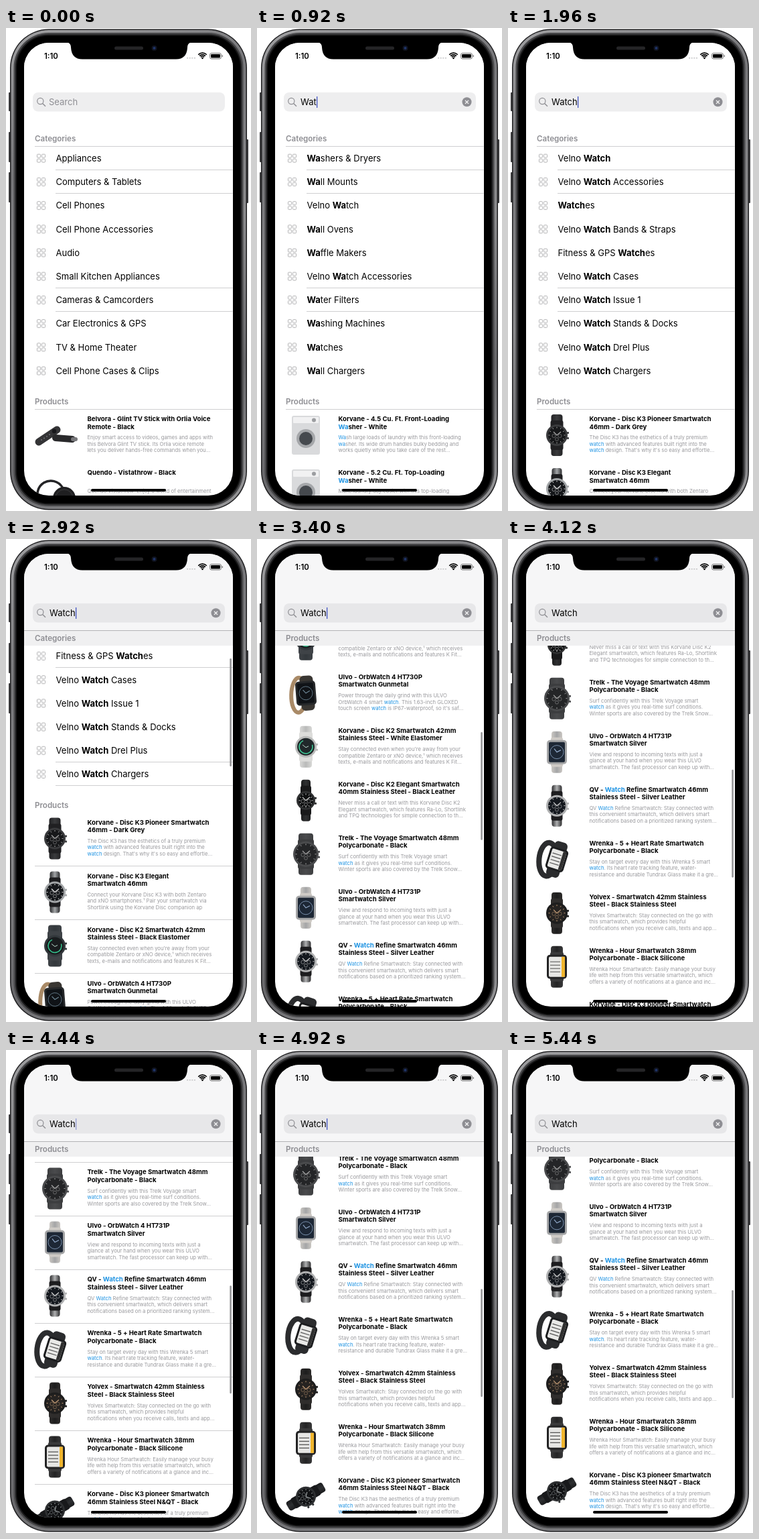
Recreate the animation shown at these times as an HTML page with a canvas. Size 366 by 720 pixels, loop 5.48 s.

```html
<!DOCTYPE html>
<html lang="en">
<head>
<meta charset="utf-8">
<title>Search as you type</title>
<style>
html, body { margin: 0; width: 100%; height: 100%; overflow: hidden; background: #fff; }
canvas { display: block; width: 366px; height: 720px; }
</style>
</head>
<body>
<canvas></canvas>
<script>
const W = 366, H = 720, LOOP = 5480, STEP = 40;
const canvas = document.querySelector('canvas'), c = canvas.getContext('2d');
const dpr = window.devicePixelRatio || 1;
canvas.width = W * dpr;
canvas.height = H * dpr;

const WORD = 'Watch', TYPED = [40, 440, 880, 1480, 1800], DELAY = 80;
const BLUE = '#1c92e2', GREY = '#8e8e93';
const clamp = v => Math.max(0, Math.min(1, v));
const font = (size, weight = 400) => `${weight} ${size}px Inter, Roboto, sans-serif`;

// ---- content ----
const split = s => s.split('|');
const finalCats = split('Velno Watch|Velno Watch Accessories|Watches|Velno Watch Bands & Straps|Fitness & GPS Watches|Velno Watch Cases|Velno Watch Issue 1|Velno Watch Stands & Docks|Velno Watch Drel Plus|Velno Watch Chargers');
const categories = [
  split('Appliances|Computers & Tablets|Cell Phones|Cell Phone Accessories|Audio|Small Kitchen Appliances|Cameras & Camcorders|Car Electronics & GPS|TV & Home Theater|Cell Phone Cases & Clips'),
  split('Washers & Dryers|Wireless Headphones|Wall Mounts|Wearable Technology|Wireless Speakers|Wall Ovens|Webcams|Window Air Conditioners|Waffle Makers|Wine Coolers'),
  split('Washers & Dryers|Wall Mounts|Velno Watch|Wall Ovens|Waffle Makers|Velno Watch Accessories|Water Filters|Washing Machines|Watches|Wall Chargers'),
  split('Velno Watch|Velno Watch Accessories|Watches|Water Filters|Velno Watch Bands & Straps|Fitness & GPS Watches|Water Coolers|Velno Watch Cases|Water Dispensers|Velno Watch Chargers'),
  finalCats, finalCats
];

const homeItems = [
  'Belvora - Glint TV Stick with Orlia Voice|Remote - Black|Enjoy smart access to videos, games and apps with|this Belvora Glint TV stick. Its Orlia voice remote|lets you deliver hands-free commands when you...',
  'Quendo - Vistathrow - Black||Quendo Vistathrow: Enjoy a world of entertainment|with a small player that can connect to your|HDTV and stream from your phone or tablet...'
];
const washItems = [
  'Korvane - 4.5 Cu. Ft. Front-Loading|Washer - White|Wash large loads of laundry with this front-loading|washer. Its wide drum handles bulky bedding and|works quietly while you take care of the rest...',
  'Korvane - 5.2 Cu. Ft. Top-Loading|Washer - White|Make laundry day easier with this top-loading|washer. Its water sensor adapts to every load|without wasting time, energy or detergent...'
];
const watchItems = [
  'Korvane - Disc K3 Pioneer Smartwatch|46mm - Dark Grey|The Disc K3 has the esthetics of a truly premium|watch with advanced features built right into the|watch design. That\'s why it\'s so easy and effortle...',
  'Korvane - Disc K3 Elegant|Smartwatch 46mm|Connect your Korvane Disc K3 with both Zentaro|and xNO smartphones.¹ Pair your smartwatch via|Shortlink using the Korvane Disc companion ap',
  'Korvane - Disc K2 Smartwatch 42mm|Stainless Steel - Black Elastomer|Stay connected even when you\'re away from your|compatible Zentaro or xNO device,¹ which receives|texts, e-mails and notifications and features K Fit...',
  'Ulvo - OrbWatch 4 HT730P|Smartwatch Gunmetal|Power through the daily grind with this ULVO|OrbWatch 4 smart watch. This 1.63-inch GLOXED|touch screen watch is IP67-waterproof, so it\'s saf...',
  'Korvane - Disc K2 Smartwatch 42mm|Stainless Steel - White Elastomer|Stay connected even when you\'re away from your|compatible Zentaro or xNO device,¹ which receives|texts, e-mails and notifications and features K Fit...',
  'Korvane - Disc K2 Elegant Smartwatch|40mm Stainless Steel - Black Leather|Never miss a call or text with this Korvane Disc K2|Elegant smartwatch, which features Ra-Lo, Shortlink|and TPQ technologies for simple connection to th...',
  'Trelk - The Voyage Smartwatch 48mm|Polycarbonate - Black|Surf confidently with this Trelk Voyage smart|watch as it gives you real-time surf conditions.|Winter sports are also covered by the Trelk Snow...',
  'Ulvo - OrbWatch 4 HT731P|Smartwatch Silver|View and respond to incoming texts with just a|glance at your hand when you wear this ULVO|smartwatch. The fast processor can keep up with...',
  'QV - Watch Refine Smartwatch 46mm|Stainless Steel - Silver Leather|QV Watch Refine Smartwatch: Stay connected with|this convenient smartwatch, which delivers smart|notifications based on a prioritized ranking system...',
  'Wrenka - 5 + Heart Rate Smartwatch|Polycarbonate - Black|Stay on target every day with this Wrenka 5 smart|watch. Its heart rate tracking feature, water-|resistance and durable Tundrax Glass make it a gre...',
  'Yolvex - Smartwatch 42mm Stainless|Steel - Black Stainless Steel|Yolvex Smartwatch: Stay connected on the go with|this smartwatch, which provides helpful|notifications when you receive calls, texts and app...',
  'Wrenka - Hour Smartwatch 38mm|Polycarbonate - Black Silicone|Wrenka Hour Smartwatch: Easily manage your busy|life with help from this versatile smartwatch, which|offers a variety of notifications at a glance and inc...',
  'Korvane - Disc K3 pioneer Smartwatch|46mm Stainless Steel N&QT - Black|The Disc K3 has the aesthetics of a truly premium|watch with advanced features built right into the|watch design. That\'s why it\'s so easy and effortle...'
];
// shape, radius, strap width, strap, rim, face, accent, angle
const looks = [
  ['round', 16, 19, '#202022', '#3a3b3d', '#17181a', '#a9a9a9', 0],
  ['round', 16, 17, '#1d1d1f', '#a3a6a8', '#15171a', '#e8e8e8', 0],
  ['ring', 16, 22, '#3f4347', '#33383c', '#191c1e', '#35c48f', 0],
  ['square', 15, 19, '#a98a67', '#26282a', '#101317', '#6d8796', -.08],
  ['ring', 16, 20, '#dcdcda', '#b9bab9', '#20282a', '#3fd09b', 0],
  ['round', 14, 16, '#19191a', '#2f3031', '#0e0f10', '#d5d5d5', 0],
  ['round', 19, 24, '#3c3d3f', '#4a4b4d', '#242527', '#aaaaaa', 0],
  ['square', 15, 18, '#cfcbc6', '#a4a5a6', '#1d2735', '#8fa7c7', 0],
  ['round', 16, 17, '#1c1c1e', '#b0b1b2', '#14181e', '#d9d9d9', 0],
  ['paper', 14, 20, '#2b2c2e', '#1c1d1f', '#e9e9e7', '#303030', .3],
  ['round', 16, 18, '#2f2d2c', '#1d1d1d', '#262321', '#c19a75', 0],
  ['paper', 15, 20, '#3a3a3b', '#232324', '#e6e6e4', '#f0b52d', 0],
  ['round', 15, 17, '#18191b', '#2d2f31', '#111214', '#9ba0a2', 1.05]
];

// ---- drawing helpers ----
function box(x, y, w, h, r, fill) {
  c.beginPath();
  c.roundRect(x, y, w, h, r);
  c.fillStyle = fill;
  c.fill();
}
function disc(x, y, r, fill) {
  c.beginPath();
  c.arc(x, y, r, 0, 7);
  c.fillStyle = fill;
  c.fill();
}
function path(points, color, width = 1) {
  c.beginPath();
  points.forEach(([x, y]) => c.lineTo(x, y));
  c.strokeStyle = color;
  c.lineWidth = width;
  c.stroke();
}
function arc(x, y, r, from, to, color, width) {
  c.beginPath();
  c.arc(x, y, r, from, to);
  c.strokeStyle = color;
  c.lineWidth = width;
  c.stroke();
}
function text(s, x, y, f, color) {
  c.font = f;
  c.fillStyle = color;
  c.fillText(s, x, y);
  return x + c.measureText(s).width;
}
// Words that begin with the query get the second font and colour.
function marked(s, x, y, query, plain, hit) {
  const parts = query ? s.split(new RegExp(`(\\b${query})`, 'i')) : [s];
  if (query && parts.length > 1) parts.push(...s.slice(parts.join('').length));
  parts.forEach((p, i) => { x = text(p, x, y, ...(i % 2 ? hit : plain)); });
}
// Hairlines survive downsampling only at some subpixel offsets.
function hairline(x, y) {
  const f = y - Math.floor(y);
  if (f > .15 && f < .55) box(x, Math.floor(y), 338.5 - x, 1, 0, '#cfcfd1');
}

// ---- product pictures ----
function watch([shape, r, sw, strap, rim, face, accent, angle]) {
  c.rotate(angle);
  const flat = shape === 'square' || shape === 'paper';
  if (strap === '#a98a67') {
    c.beginPath();
    c.ellipse(-11, 2, 11, 26, .1, 0, 7);
    c.strokeStyle = strap;
    c.lineWidth = 6;
    c.stroke();
    box(-8, -26, 20, 52, 6, '#393632');
  } else if (shape === 'paper' && angle) {
    c.beginPath();
    c.ellipse(-13, 4, 13, 25, -.2, 0, 7);
    c.strokeStyle = strap;
    c.lineWidth = 8;
    c.stroke();
    box(-10, -27, 20, 54, 6, strap);
  } else {
    const g = c.createLinearGradient(-sw / 2, 0, sw / 2, 0);
    g.addColorStop(0, strap);
    g.addColorStop(.5, rim);
    g.addColorStop(1, strap);
    box(-sw / 2 + 1, -31, sw - 2, 62, 4, g);
    box(-sw / 2, -22, sw, 44, 3, strap);
  }
  if (flat) {
    box(-r, -r - 3, 2 * r, 2 * r + 6, 5, rim);
    box(-r + 3, -r, 2 * r - 6, 2 * r, 2, face);
    if (shape === 'paper') {
      box(r - 8, -r, 5, 2 * r, 0, accent);
      for (let y = -8; y < 10; y += 5) box(-r + 5, y, r, 1.2, 0, '#555');
    } else {
      arc(0, 0, r - 5, 0, 7, accent, .8);
      path([[-4, -5], [0, 0], [6, -3]], accent, 1.2);
    }
    return;
  }
  box(r - 1, -5, 3, 3, 1, rim);
  box(r - 1, 3, 3, 3, 1, rim);
  disc(0, 0, r, rim);
  disc(0, 0, r - 3, face);
  if (shape === 'ring') {
    arc(0, 0, r - 6, -.3, 4.3, accent, 1.5);
    path([[-5, -3], [0, 1], [4, -1]], '#b9d8cc');
    return;
  }
  for (let i = 0; i < 12; i++) {
    const a = i * Math.PI / 6, x = Math.cos(a), y = Math.sin(a);
    path([[x * (r - 5.5), y * (r - 5.5)], [x * (r - 3.6), y * (r - 3.6)]], accent);
  }
  arc(-4.5, 1, 2.6, 0, 7, accent, .5);
  arc(4.5, 1, 2.6, 0, 7, accent, .5);
  arc(0, 6, 2.4, 0, 7, accent, .5);
  path([[-5, -5], [0, 0], [6, -5]], accent, 1.2);
}
function tvStick() {
  c.lineCap = 'round';
  path([[-24, 10], [3, -8]], '#343436', 11);
  path([[1, 4], [26, 6]], '#29292b', 10);
  path([[27, 6], [31, 6]], '#77777a', 6);
  disc(-1, -6, 3.2, '#17171a');
  for (let i = 0; i < 4; i++) disc(-8 - i * 4, -1 + i * 2.7, 1, '#707074');
  c.lineCap = 'butt';
}
function streamer() {
  arc(-6, 8, 20, 2.6, 5.9, '#242426', 3.5);
  disc(14, 14, 17, '#1f1f21');
  arc(14, 14, 13, 0, 7, '#39393b', 1);
  box(-29, 16, 11, 17, 2, '#2f2f31');
}
function washer() {
  box(-21, -29, 42, 58, 3, '#d9dadc');
  box(-19, -27, 38, 9, 1, '#f1f1f2');
  disc(12, -22.5, 3, '#9b9da0');
  disc(0, 5, 14, '#a5a7aa');
  disc(0, 5, 10, '#45494e');
}

const products = [
  { items: homeItems, art: i => i ? streamer() : tvStick() },
  { items: washItems, art: washer },
  { items: washItems, art: washer },
  ...Array(3).fill({ items: watchItems, art: i => watch(looks[i]) })
];

// ---- motion ----
function hermite(t, [t0, s0, v0], [t1, s1, v1]) {
  const d = t1 - t0, u = (t - t0) / d, w = 1 - u;
  return s0 * (1 + 2 * u) * w * w + v0 * d * u * w * w
       + s1 * u * u * (3 - 2 * u) - v1 * d * u * u * w;
}
const drags = [[2400, 0, 0], [2920, 160.5, 1.1], [3400, 617.2, .35], [3400, 617.2, 0], [3520, 617.2, 0], [3800, 788.6, .26]];
function scrollAt(t) {
  if (t <= drags[0][0]) return 0;
  if (t >= 3800) return 913.2 - 124.6 * Math.exp((3800 - t) / 478.4);
  const i = drags.findIndex(k => t < k[0]);
  return hermite(t, drags[i - 1], drags[i]);
}
const blink = [[3400, 1], [3800, .5], [3960, 0], [4280, 0], [4440, .5], [4600, 1], [5200, 1], [5400, 0]];
function caretAt(t) {
  const i = blink.findIndex(k => t < k[0]);
  if (i < 1) return i ? 0 : 1;
  const [t0, a] = blink[i - 1], [t1, b] = blink[i];
  return a + (b - a) * (t - t0) / (t1 - t0);
}

// ---- scene ----
function phone() {
  [[96, 28], [155, 45], [215, 45]].forEach(([y, h]) => box(4, y, 4, h, 1, '#3c3c3e'));
  box(358, 166, 4, 95, 1, '#3c3c3e');
  box(6, 1.5, 354, 717, 58, '#202022');
  const steel = c.createLinearGradient(0, 0, W, H);
  ['#a2a2a4', '#77777a', '#8c8c8e', '#68686b', '#9a9a9c'].forEach((k, i) => steel.addColorStop(i / 4, k));
  box(7.5, 3, 351, 714, 56.5, steel);
  box(11.5, 7, 343, 706, 52, '#48484a');
  box(14, 9.5, 338, 701, 49.5, '#1a1a1b');
  box(16, 11.5, 334, 697, 47.5, '#000');
}
function notch() {
  c.beginPath();
  c.moveTo(90, 21);
  c.quadraticCurveTo(97, 22, 97, 29);
  c.quadraticCurveTo(98, 46.5, 114, 46.5);
  c.lineTo(254, 46.5);
  c.quadraticCurveTo(270, 46.5, 271, 29);
  c.quadraticCurveTo(271, 22, 278, 21);
  c.fillStyle = '#000';
  c.fill();
  box(162, 27.5, 43, 5, 2.5, '#252527');
  disc(221.5, 30, 4, '#10131f');
  disc(221.5, 30, 2, '#1f3468');
}
function statusBar() {
  text('1:10', 57, 46, font(11.4, 600), '#000');
  for (let i = 0; i < 4; i++) box(270 + i * 3.6, 44, 2.2, 1.6, .5, '#c4c4c6');
  for (const r of [3.6, 6.2, 8.8]) arc(293.5, 46, r, -2.36, -.78, '#000', 1.7);
  disc(293.5, 45, 1.3, '#000');
  c.beginPath();
  c.roundRect(304.5, 37.5, 17, 8.5, 2.5);
  c.strokeStyle = '#777';
  c.lineWidth = 1;
  c.stroke();
  box(306, 39, 14, 5.5, 1.3, '#000');
  box(322.7, 40.2, 1.3, 3, .6, '#777');
}
function searchField(typed, t, shade) {
  box(40, 96, 287, 28.5, 8, shade ? '#e7e7e9' : '#eeeeef');
  arc(51.3, 109, 4.6, 0, 7, GREY, 1.2);
  path([[54.6, 112.4], [59, 116.8]], GREY, 1.4);
  if (!typed) {
    text('Search', 64, 115, font(13), GREY);
    return;
  }
  const end = text(typed, 65, 115, font(13), '#000');
  c.globalAlpha = caretAt(t);
  box(end + .3, 102, 1.3, 17, .5, '#4254c2');
  c.globalAlpha = 1;
  disc(313.5, 110.3, 7, GREY);
  path([[311, 107.8], [316, 112.8]], '#fff', 1.2);
  path([[316, 107.8], [311, 112.8]], '#fff', 1.2);
}
function categoryRow(name, y, query) {
  c.strokeStyle = '#b4b4b6';
  c.lineWidth = 1;
  for (const dx of [0, 7]) for (const dy of [0, 7]) {
    c.beginPath();
    c.roundRect(46.5 + dx, y - 6 + dy, 5, 5, 1);
    c.stroke();
  }
  marked(name, 74.5, y + 4.8, query, [font(13), '#000'], [font(13, 700), '#000']);
}
function productRow({ items, art }, i, top, query, fade) {
  c.save();
  c.globalAlpha = fade;
  c.translate(73, top + 39);
  art(i);
  c.restore();
  items[i].split('|').forEach((s, n) => {
    const f = n < 2 ? font(9.6, 700) : font(7.7);
    const y = top + (n < 2 ? 18 + n * 11.5 : 45.2 + (n - 2) * 9.6);
    marked(s, 121.5, y, query, [f, n < 2 ? '#000' : '#98989c'], [f, BLUE]);
  });
}
function sectionHeader(name, y, stuck) {
  if (stuck) box(27, 137, 312, 22, 0, '#f0f0f1');
  text(name, 43, y + 4.3, font(11.6, 600), GREY);
}

function draw(t) {
  const count = delay => TYPED.filter(k => t >= k + delay).length;
  const stage = count(DELAY), query = WORD.slice(0, stage);
  const s = scrollAt(t), shade = clamp(s / 18);
  const swapped = stage === 1 || stage === 3;
  const fade = swapped ? clamp((t - TYPED[stage - 1] - DELAY + STEP) / 120) : 1;

  c.setTransform(dpr, 0, 0, dpr, 0, 0);
  c.fillStyle = '#fff';
  c.fillRect(0, 0, W, H);
  phone();
  c.save();
  c.beginPath();
  c.roundRect(27, 22, 312, 675, 37);
  c.clip();
  c.fillStyle = '#fff';
  c.fillRect(27, 22, 312, 675);

  categories[stage].forEach((name, i) => {
    const y = 194.2 + 35.2 * i - s;
    if (y > 110) categoryRow(name, y, query);
    hairline(74, 176 + 35.2 * (i + 1) - s);
  });
  hairline(43, 176.3 - s);
  hairline(43, 568.3 - s);
  const list = products[stage];
  list.items.forEach((_, i) => {
    const top = 568 + 80 * i - s;
    if (top < 50 || top > 700) return;
    productRow(list, i, top, query, fade);
    hairline(43, top + 80);
  });

  const below = 557 - s, catY = Math.min(Math.max(147.5, 165 - s), below - 21);
  if (catY > 120) sectionHeader('Categories', catY, catY <= 147.5);
  sectionHeader('Products', Math.max(147.5, below), below <= 147.5);

  c.globalAlpha = shade;
  box(27, 22, 312, 115, 0, '#f6f6f7');
  box(27, 136, 312, 1, 0, '#b4b4b6');
  if (s > 0) box(334.3, 139.4 + .2405 * s, 2.6, 161, 1.3, '#949496');
  c.globalAlpha = 1;
  if (!shade) box(27, 22, 312, 115, 0, '#fff');

  searchField(WORD.slice(0, count(0)), t, shade > .5);
  statusBar();
  notch();
  box(127, 687, 112, 4, 2, '#000');
  c.restore();
}

const start = performance.now();
function tick() {
  const t = (performance.now() - start) % LOOP;
  draw(Math.floor(t / STEP) * STEP);
  requestAnimationFrame(tick);
}
tick();
</script>
</body>
</html>
```
